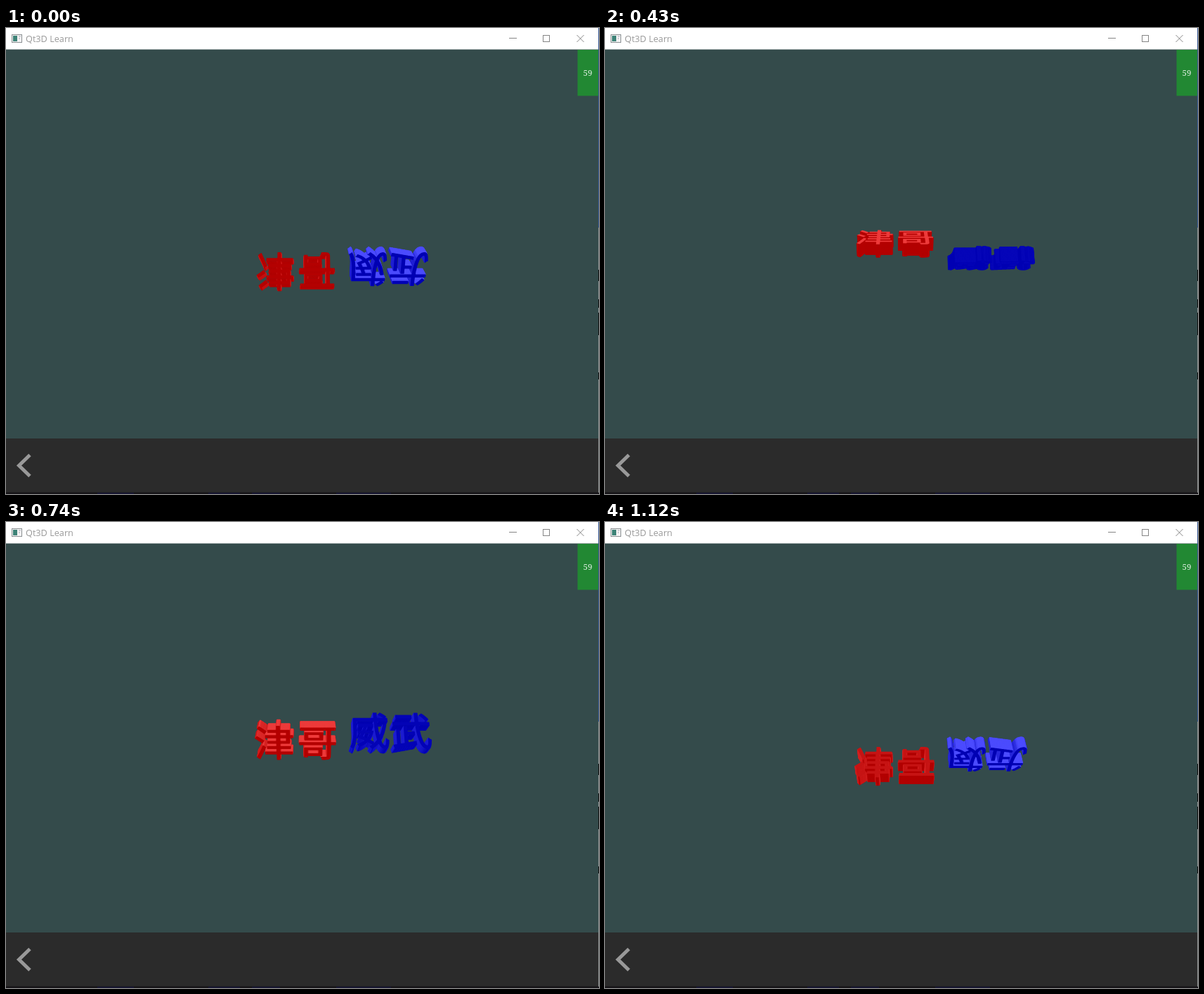
An HTML page with a canvas that plays this animation: 844 px wide and 663 px high, repeating every 1.2 s.

```html
<!DOCTYPE html>
<html lang="zh-CN">
<head>
<meta charset="utf-8">
<title>Qt3D Learn</title>
<style>
html, body { margin: 0; width: 844px; height: 663px; overflow: hidden; background: #344b4b; }
svg, canvas { position: absolute; left: 0; top: 0; display: block; }
.title { font: 12.7px "Open Sans", "Noto Sans", sans-serif; fill: #999; }
.fps { font: 11.5px "Noto Serif", serif; fill: #e4f2e6; text-anchor: middle; }
</style>
</head>
<body>
<svg width="844" height="663" viewBox="0 0 844 663">
  <rect width="844" height="663" fill="#344b4b"/>
  <rect width="843" height="30.5" fill="#fff"/>
  <rect x="8.5" y="9.5" width="14" height="11" fill="#f4f4f4" stroke="#8a8f92"/>
  <rect x="10" y="11" width="6" height="8" fill="#3d8277"/>
  <path d="M18 12h3M18 15h2" stroke="#aab" fill="none"/>
  <text class="title" x="28" y="20">Qt3D Learn</text>
  <g fill="none" stroke="#858585">
    <path d="M716 14.5h11"/>
    <rect x="764.5" y="10.5" width="9" height="9"/>
    <path d="M812.5 10l10 10M822.5 10l-10 10"/>
  </g>
  <rect x="813.5" y="31" width="29.5" height="65.5" fill="#228833"/>
  <text class="fps" x="828" y="68">59</text>
  <rect y="584" width="843" height="77" fill="#2b2b2b"/>
  <path d="M34 607.5L18.5 622.5L34 637.5" fill="none" stroke="#999" stroke-width="5"/>
  <rect y="660" width="844" height="1" fill="#222"/>
  <rect y="661" width="844" height="2" fill="#161418"/>
  <path d="M130 662h52M288 662h45M350 662h40M470 662h78" stroke="#17164a" fill="none"/>
  <rect x="843" width="1" height="284" fill="#3b5c98"/>
  <rect x="843" y="284" width="1" height="377" fill="#8b9090"/>
  <path d="M843.5 344v16M843.5 386v12M843.5 405v32M843.5 490v10" stroke="#111" fill="none"/>
</svg>
<canvas id="stage" width="844" height="663"></canvas>
<script>
const ctx = document.getElementById("stage").getContext("2d");
const LOOP = 1200;
const STEPS = [0, 70, 110, 200, 290, 350, 430, 510, 590, 660, 740, 810, 890, 970, 1040, 1120];
const EYE = { x: 421.5, y: 307, dist: 669 };
const PIVOT_Y = 324;
const DEPTH = 20;
const DETAIL = 1.5;

// "upright" is the time at which a word stands straight, facing the eye.
const words = [
  { text: "津哥", x: 356, em: 55, step: 59, dir: 1, upright: 650, tint: [1, 0, 0] },
  { text: "威武", x: 487, em: 57, step: 59, dir: -1, upright: 675, tint: [0, 0, 1] }
];

// Cell edges: 0 top, 1 right, 2 bottom, 3 left; each pair runs with the ink on its left.
const CELL = [[], [3, 0], [0, 1], [3, 1], [1, 2], [3, 0, 1, 2], [0, 2], [3, 2],
  [2, 3], [2, 0], [0, 1, 2, 3], [2, 1], [1, 3], [1, 0], [0, 3], []];

// Rasterises a word and traces its ink into closed outlines.
function trace(word) {
  const size = word.em * DETAIL, pad = 8, base = Math.round(size) + pad;
  const w = Math.ceil(word.step * 2 * DETAIL) + pad * 2, h = Math.ceil(size * 1.3) + pad * 2;
  const pen = Object.assign(document.createElement("canvas"), { width: w, height: h })
    .getContext("2d", { willReadFrequently: true });
  pen.font = `${size}px "Noto Sans CJK SC", "Noto Sans CJK JP", "Noto Sans CJK", sans-serif`;
  pen.lineWidth = size * 0.02;
  [...word.text].forEach((c, i) => {
    const x = pad + i * word.step * DETAIL;
    pen.fillText(c, x, base);
    pen.strokeText(c, x, base);
  });
  const data = pen.getImageData(0, 0, w, h).data;
  const ink = (x, y) => data[(y * w + x) * 4 + 3] / 255;
  const cut = (a, b) => (0.5 - a) / (b - a);
  const links = new Map();

  for (let y = 0; y < h - 1; y++) for (let x = 0; x < w - 1; x++) {
    const a = ink(x, y), b = ink(x + 1, y), c = ink(x + 1, y + 1), d = ink(x, y + 1);
    const pairs = CELL[(a > 0.5) + 2 * (b > 0.5) + 4 * (c > 0.5) + 8 * (d > 0.5)];
    const key = e => 2 * ((y + (e === 2)) * w + x + (e === 1)) + e % 2;
    const point = e => [
      [x + cut(a, b), y], [x + 1, y + cut(b, c)], [x + cut(d, c), y + 1], [x, y + cut(a, d)]
    ][e];
    for (let i = 0; i < pairs.length; i += 2)
      links.set(key(pairs[i]), { at: point(pairs[i]), next: key(pairs[i + 1]) });
  }

  const loops = [];
  while (links.size) {
    let key = links.keys().next().value;
    const loop = [];
    while (links.has(key)) {
      const link = links.get(key);
      links.delete(key);
      loop.push([word.x + (link.at[0] + 0.5 - pad) / DETAIL, (base - link.at[1] - 0.5) / DETAIL]);
      key = link.next;
    }
    if (loop.length > 5) loops.push(loop);
  }
  return loops;
}

// Turns outlines into wall strips with outward normals.
function wallsOf(loops) {
  return loops.flatMap(loop => loop.map((p, i) => {
    const at = k => loop[(i + k + loop.length) % loop.length];
    const q = at(1), from = at(-1), to = at(2);
    const dx = to[0] - from[0], dy = to[1] - from[1], len = Math.hypot(dx, dy) || 1;
    return { p, q, nx: dy / len, ny: -dx / len, mx: (p[0] + q[0]) / 2, my: (p[1] + q[1]) / 2 };
  }));
}

function shade(tint, light) {
  const v = 76 * Math.min(1, Math.max(0, light));
  return `rgb(${tint.map(c => Math.round(Math.min(255, c * 179 + v))).join()})`;
}

function drawWord(word, time) {
  const { tint, loops, walls } = word;
  const phase = (time - word.upright) / LOOP * 2 * Math.PI;
  const angle = word.dir * phase, cos = Math.cos(angle), sin = Math.sin(angle);
  const eyeUp = PIVOT_Y - EYE.y;
  const camY = eyeUp * cos + EYE.dist * sin, camZ = EYE.dist * cos - eyeUp * sin;
  const project = ([x, y], z) => {
    const s = EYE.dist / (EYE.dist - y * sin - z * cos);
    return [EYE.x + (x - EYE.x) * s, EYE.y + (eyeUp - y * cos + z * sin) * s];
  };
  const lift = n => Math.max(0, n);

  const seen = walls.filter(f => f.nx * (EYE.x - f.mx) + f.ny * (camY - f.my) > 0);
  for (const f of seen) f.far = Math.hypot(EYE.x - f.mx, camY - f.my);
  seen.sort((a, b) => b.far - a.far);
  ctx.lineWidth = 0.7;
  for (const f of seen) {
    const up = lift(f.ny * cos);
    const lit = f.ny < 0 ? Math.min(1, up * 2) : up * up;
    const side = 0.6 * Math.abs(f.nx) * (0.5 + 0.5 * Math.sin(phase));
    ctx.fillStyle = ctx.strokeStyle = shade(tint, Math.max(lit, side));
    ctx.beginPath();
    ctx.moveTo(...project(f.p, 0));
    ctx.lineTo(...project(f.q, 0));
    ctx.lineTo(...project(f.q, DEPTH));
    ctx.lineTo(...project(f.p, DEPTH));
    ctx.closePath();
    ctx.fill();
    ctx.stroke();
  }

  // The cap that faces the eye always covers the walls behind it.
  const front = camZ > DEPTH;
  if (!front && camZ > 0) return;
  ctx.fillStyle = shade(tint, lift(front ? -sin : sin) ** 3);
  ctx.beginPath();
  for (const loop of loops) {
    loop.forEach((p, i) => ctx[i ? "lineTo" : "moveTo"](...project(p, front ? DEPTH : 0)));
    ctx.closePath();
  }
  ctx.fill("evenodd");
}

for (const word of words) {
  word.loops = trace(word);
  word.walls = wallsOf(word.loops);
}

let shown = -1;
const start = performance.now();
function tick() {
  const time = (performance.now() - start) % LOOP;
  const step = STEPS.findLast(s => s <= time);
  if (step !== shown) {
    shown = step;
    ctx.clearRect(0, 0, 844, 663);
    for (const word of words) drawWord(word, step);
  }
  requestAnimationFrame(tick);
}
tick();
</script>
</body>
</html>
```
